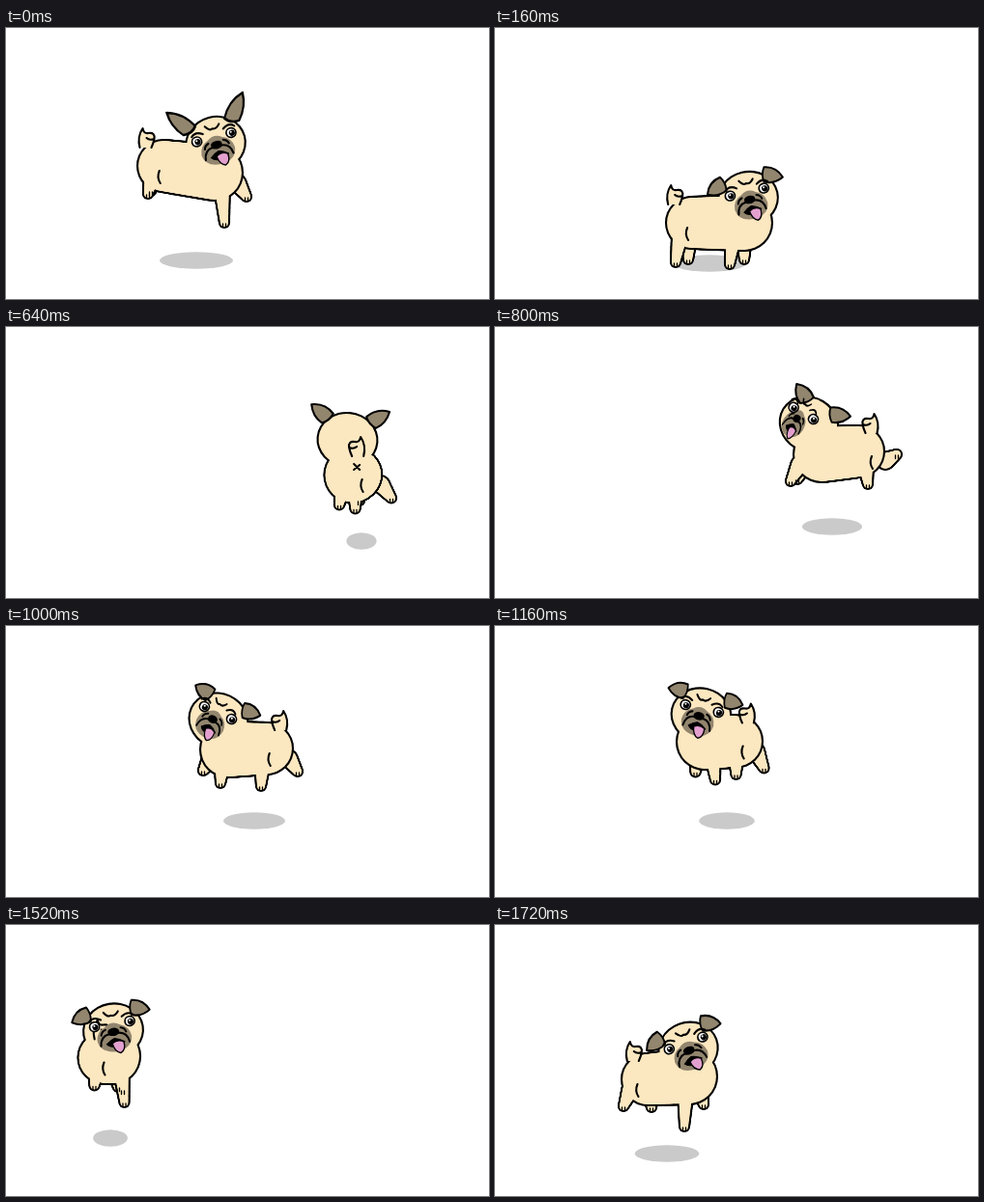
An HTML page with a canvas that plays this animation: 500x281 px, repeating every 1800 ms.

```html
<!DOCTYPE html>
<html lang="en">
<head>
<meta charset="utf-8">
<title>Hopping pug</title>
<style>
html, body { margin: 0; width: 100%; height: 100%; overflow: hidden; background: #fff; }
canvas { display: block; }
</style>
</head>
<body>
<canvas id="stage" width="500" height="281"></canvas>
<script>
const ctx = document.getElementById('stage').getContext('2d');
const CREAM = '#fbe7c0', MASK = '#93866f', PINK = '#e3a0cf', SHADOW = '#cacaca', INK = '#000';
const STEPS = 20, PEN = 2.1;
const lift = [40, 35, -6, 24]; // four drawings to a hop

// Closes a list of keys into a loop; the head has then turned once around.
const loop = keys => {
  const last = { ...keys[0], step: STEPS };
  if (last.look) last.look = [last.look[0], last.look[1] + 360, last.look[2]];
  return [...keys, last];
};

// Where the shadow lies.
const path = loop([[0, 197, 241], [2, 222, 244], [5, 330, 236], [7, 368, 222], [9, 349, 207],
  [11, 257, 202], [13, 240, 202], [15, 140, 206], [17, 108, 221], [19, 178, 237]]
  .map(([step, ...at]) => ({ step, at })));

// Skeleton relative to the hopping point. look: head tilt, turn away from the viewer, ear drop.
const poses = loop([
  { step: 0, look: [-15, 8, -22], head: [20, -81], chest: [19, -51], rump: [-34, -58],
    front: [29, 1], front2: [52, -26], rear: [-50, -29], rear2: [-47, -32] },
  { step: 2, look: [-13, 15, 7], head: [40, -73], chest: [36, -48], rump: [-18, -48],
    front: [21, -5], front2: [36, -10], rear: [-35, -7], rear2: [-22, -11] },
  { step: 5, look: [-20, 65, -15], head: [-5, -91], chest: [-8, -49], rump: [-39, -47],
    front: [-3, -15], front2: [32, -22], rear: [-50, -10], rear2: [-5, -1] },
  { step: 9, look: [31, 310, -8], head: [-24, -71], chest: [-11, -40], rump: [27, -43],
    front: [-43, -12], front2: [-36, -14], rear: [37, -9], rear2: [67, -40] },
  { step: 11, look: [25, 327, -2], head: [-37, -80], chest: [-27, -50], rump: [13, -51],
    front: [-35, -15], front2: [-53, -28], rear: [7, -12], rear2: [45, -27] },
  { step: 15, look: [1, 355, 4], head: [-16, -69], chest: [-19, -44], rump: [7, -44],
    front: [11, 0], front2: [-12, -3], rear: [12, -14], rear2: [32, -12] },
  { step: 19, look: [-20, 365, 7], head: [22, -84], chest: [23, -56], rump: [-20, -53],
    front: [18, -4], front2: [38, -27], rear: [-45, -25], rear2: [-16, -24] }
]);

const shapes = {
  ear: 'M-2-7Q12-10 22 0Q13 9 1 8Q-4 1-2-7Z',
  tail: 'M-7 5Q-10-6-4-15Q-3-9 2-10Q9-11 8-4Q7 1 5 5M8-4Q3-2 0-5',
  mask: 'M-18 15Q-17 5-8 2Q0-4 8 2Q17 5 18 15Q17 28 0 29Q-17 28-18 15Z',
  jowls: 'M-15 21Q-14 11-5 10Q0 13 5 10Q14 11 15 21M-8 5Q-12 6-13 10M8 5Q12 6 13 10',
  mouth: 'M-9 20Q-4 16 0 15Q5 16 10 20Q6 25 0 24Q-6 24-9 20Z',
  tongue: 'M-3 20Q3 16 9 20Q10 29 4 31Q-2 29-3 20Z',
  brows: 'M-23-6Q-18-11-11-6M23-6Q18-11 11-6M-7-13Q-3-7 0-9Q4-7 8-12',
  cross: 'M-3-3L3 3M3-2L-3 3',
  crease: 'M7-5Q4 2 8 8',
  toes: 'M-1.5 1V4.5M1.5 1V4.5'
};
for (const name in shapes) shapes[name] = new Path2D(shapes[name]);

function blend(keys, step) {
  const k = keys.findLastIndex(key => key.step <= step);
  const from = keys[k], to = keys[k + 1], f = (step - from.step) / (to.step - from.step);
  const out = {};
  for (const part in from)
    if (part !== 'step') out[part] = from[part].map((v, i) => v + (to[part][i] - v) * f);
  return out;
}

function oval(x, y, rx, ry, fill, tilt = 0) {
  ctx.beginPath();
  ctx.ellipse(x, y, rx, ry, tilt, 0, 7);
  ctx.fillStyle = fill;
  ctx.fill();
}

// Runs a drawing in its own coordinates.
function at([x, y], paint) {
  ctx.save();
  ctx.translate(x, y);
  paint();
  ctx.restore();
}

function shape(name, fill, width = PEN) {
  if (fill) { ctx.fillStyle = fill; ctx.fill(shapes[name]); }
  if (width) { ctx.lineWidth = width; ctx.stroke(shapes[name]); }
}

// Tapered limb made of overlapping discs.
function limb([ax, ay], [bx, by], ra, rb) {
  return (grow, fill) => {
    for (let s = 0; s <= 1; s += 1 / 24)
      oval(ax + (bx - ax) * s, ay + (by - ay) * s,
        ra + (rb - ra) * s + grow, ra + (rb - ra) * s + grow, fill);
  };
}

// Outlines several parts as a single silhouette.
function merge(...parts) {
  for (const part of parts) part(PEN / 2, INK);
  for (const part of parts) part(-PEN / 2, CREAM);
}

const hip = (centre, paw) => [centre[0] + (paw[0] - centre[0]) * .7, centre[1] + 10];
const leg = (centre, paw) => limb(hip(centre, paw), paw, 9, 5);

function drawFace(sin, cos) {
  ctx.translate(24 * sin ** 3, -7);
  at([4 * sin, 0], () => {
    ctx.scale(cos, 1);
    shape('mask', MASK, 0);
    shape('mouth', INK, 1);
    shape('tongue', PINK, 1.4);
    shape('jowls');
    oval(0, 8, 6, 3.8, INK);
    shape('brows');
  });
  for (const side of [-1, 1]) {
    const x = side * 18.5 * cos;
    oval(x, 0, 5.9, 5.7, INK);
    oval(x, 0, 4.2, 4, '#fff');
    oval(x + .8, .5, 3.1, 3.1, INK);
    oval(x, -.8, 1, 1, '#fff');
  }
}

function drawDog(dog, sin, cos) {
  const { head, chest, rump } = dog, [tilt, , drop] = dog.look;
  const angle = tilt * Math.PI / 180;
  merge(leg(rump, dog.rear2));
  merge(leg(chest, dog.front2));
  merge(limb(rump, chest, 27, 29), leg(rump, dog.rear), leg(chest, dog.front),
    (grow, fill) => oval(...head, 31 + grow, 28 + grow, fill, angle));
  at(hip(rump, dog.rear), () => shape('crease'));
  for (const paw of ['front', 'front2', 'rear', 'rear2']) at(dog[paw], () => shape('toes', null, 1.3));

  const back = rump[0] - chest[0];
  at([rump[0] + back * .33, rump[1] - 24], () => {
    if (cos < .5) at([0, 16], () => shape('cross'));
    ctx.scale(back < 0 ? 1 : -1, 1);
    shape('tail', CREAM);
  });

  at(head, () => {
    ctx.rotate(angle);
    for (const side of [-1, 1]) at([side * Math.max(8, 23 * Math.abs(cos)), -21], () => {
      ctx.scale(side, 1);
      ctx.rotate(Math.atan2(drop, 17));
      ctx.scale(Math.hypot(drop, 17) / 21, 1);
      shape('ear', MASK);
    });
    if (cos > 0) drawFace(sin, cos);
  });
}

function render(step) {
  const dog = blend(poses, step), [x, y] = blend(path, step).at, height = lift[step % 4];
  const turn = dog.look[1] * Math.PI / 180;
  if (height < 0) // all paws reach the floor
    for (const paw of ['front', 'front2', 'rear', 'rear2']) dog[paw][1] = Math.max(dog[paw][1], -10);

  ctx.clearRect(0, 0, 500, 281);
  const length = Math.hypot(dog.rump[0] - dog.chest[0], dog.rump[1] - dog.chest[1]);
  oval(x, y, 14 + .45 * length, 8.7, SHADOW);
  at([x, y - height], () => drawDog(dog, Math.sin(turn), Math.cos(turn)));
}

ctx.lineCap = ctx.lineJoin = 'round';
function tick() {
  const t = performance.now() % 1800, hop = t % 360;
  render(4 * Math.floor(t / 360) + (hop >= 80) + (hop >= 160) + (hop >= 280));
  requestAnimationFrame(tick);
}
tick();
</script>
</body>
</html>
```
